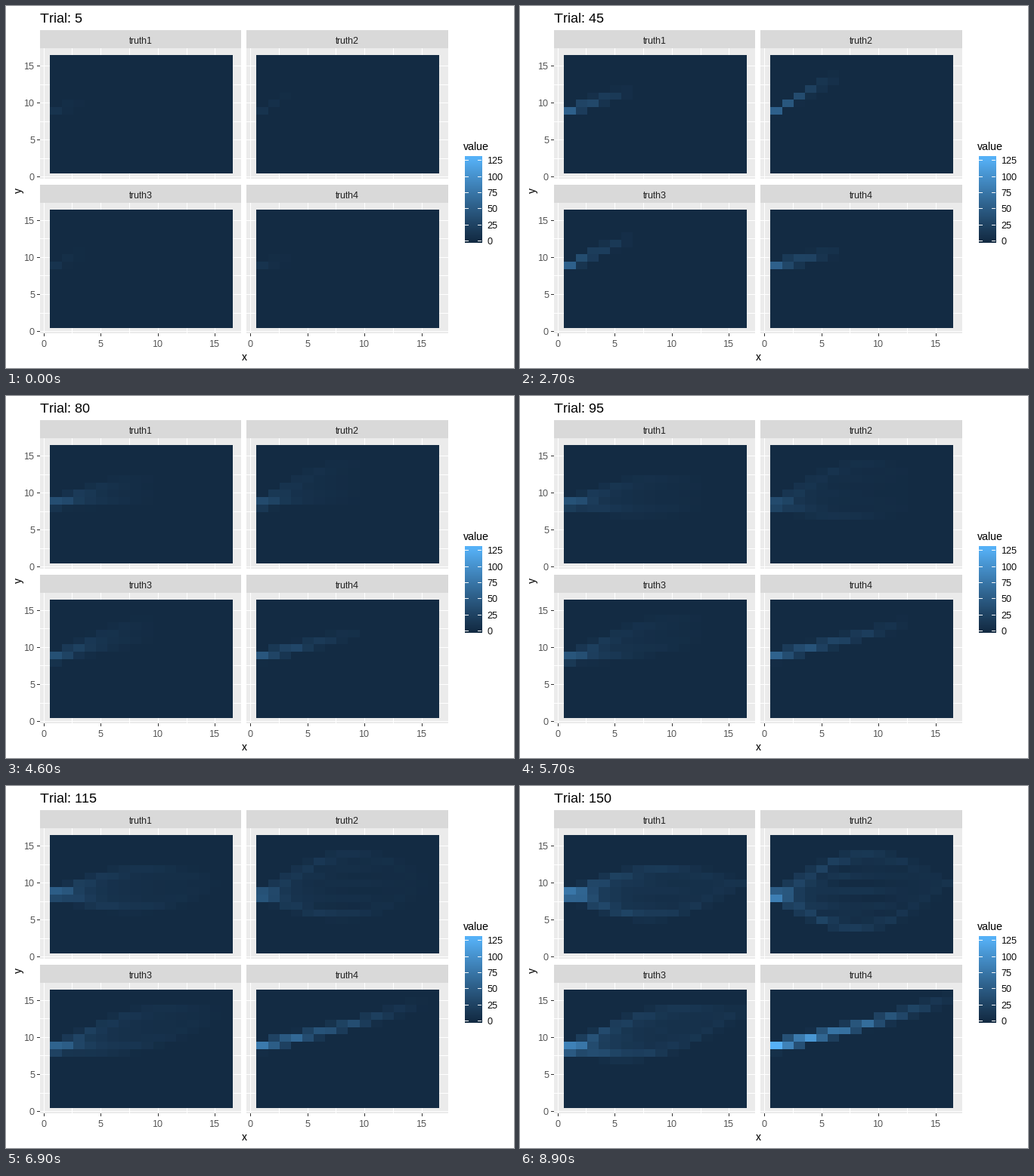
Animation, 672 px wide and 480 px high, one loop 9000 ms. Source, as a matplotlib script:

```python
import matplotlib.pyplot as plt
import numpy as np
from matplotlib.animation import FuncAnimation
from matplotlib.patches import Rectangle

plt.rcParams.update({
    "font.family": "Liberation Sans",
    "text.hinting": "default",
    "text.hinting_factor": 1,  # whole-pixel letter spacing
})

W, H, DPI = 672, 480, 96
FRAMES, STEP = 90, 100
N, VMAX = 16, 129
TILE_W, TILE_H = 242 / N, 157 / N

# ---------- colour scale: straight line in Lab ----------
TO_XYZ = np.array([[.4124, .3576, .1805], [.2126, .7152, .0722], [.0193, .1192, .9505]])
WHITE = TO_XYZ.sum(axis=1)


def rgb_to_lab(rgb):
    c = np.array(rgb) / 255
    lin = np.where(c > .04045, ((c + .055) / 1.055) ** 2.4, c / 12.92)
    t = TO_XYZ @ lin / WHITE
    f = np.where(t > .008856, np.cbrt(t), 7.787 * t + 16 / 116)
    return np.array([116 * f[1] - 16, 500 * (f[0] - f[1]), 200 * (f[1] - f[2])])


def lab_to_rgb(lab):
    fy = (lab[..., 0] + 16) / 116
    f = np.stack([fy + lab[..., 1] / 500, fy, fy - lab[..., 2] / 200], axis=-1)
    xyz = np.where(f > .2069, f ** 3, (f - 16 / 116) / 7.787) * WHITE
    lin = np.clip(xyz @ np.linalg.inv(TO_XYZ).T, 0, 1)
    return np.clip(np.where(lin > .0031308, 1.055 * lin ** (1 / 2.4) - .055, 12.92 * lin), 0, 1)


LOW, HIGH = rgb_to_lab((19, 43, 67)), rgb_to_lab((86, 177, 247))


def shade(values):
    t = np.clip(np.asarray(values) / VMAX, 0, 1)[..., None]
    return lab_to_rgb(LOW + t * (HIGH - LOW))


# ---------- timing: two ticks of rest, one halfway ----------
QUIET = (0, 1, 2, 6, 7, 10, 13, 25)  # steps in which the maps stand still
pace = [0 if k in QUIET else 1 for k in range(29)]
travel = np.concatenate([[0], np.cumsum(pace)])
LONG = {2: 0, 87: 28}  # first and last transition take two ticks


def state_at(i):
    for start, k in LONG.items():
        if i in (start, start + 1):
            return k + (i - start + 1) / 3
    n, r = divmod(i + 2, 3)
    return max(n - 1 + (.5 if r == 2 else 0), 0)


def warp(s):
    return np.interp(s, range(30), travel)


# ---------- maps: a fan of arcs from the left edge to a goal on the right ----------
STOPS = warp([0, 8.5, 15, 18.3, 21, 24.5, 29])
PEAK = [9, 55, 46, 55, 100, 58, 135]   # weight of the first column
REACH = [2.5, 5.8, 9, 12, 13, 16, 16]  # columns until the weight runs out
FAN = [0, 0, .45, .7, .7, 1, 1]        # how far the fan has opened downwards
PANELS = [(10, 2.5, -3.5), (10, 4.5, -5), (13.5, 2.3, -2.9), (15.2, -.3, -.3)]  # goal, bulges
LANES = np.array([2, 1, 1, 1, 2]) / 7

cells = np.arange(1, N + 1)
part = (cells - 1) / (N - 1)


def density(goal, up, low, peak, reach, fan):
    mass = peak * np.clip(1 - (cells - 1) / reach, 0, 1)
    start = 9 + fan * low / 8
    grid = np.zeros((N, N))
    for share, bulge in zip(LANES, np.linspace(up, up + fan * (low - up), len(LANES))):
        y = start + (goal - start) * part + bulge * np.sin(np.pi * part)
        grid += share * mass * np.clip(1 - abs(cells[:, None] - y), 0, 1)
    return grid


def maps_at(s):
    now = [np.interp(warp(s), STOPS, key) for key in (PEAK, REACH, FAN)]
    return [density(*panel, *now) for panel in PANELS]


# ---------- stage ----------
fig = plt.figure(figsize=(W / DPI, H / DPI), dpi=DPI, facecolor="white")
ax = fig.add_axes([0, 0, 1, 1])
ax.axis("off")


def box(x, y, w, h, color, z=1):
    ax.add_patch(Rectangle((x, y), w, h, fc=color, lw=0, antialiased=False, zorder=z))


def label(x, y, text, px, color="black", ha="left", **kw):
    return ax.text(x, y, text, fontsize=px * 72 / DPI, color=color, ha=ha,
                   **{"va": "baseline", **kw})


def add_panel(row, col):
    left, width = ((45, 266), (318, 267))[col]
    top = 32 + 205 * row
    box(left, top, width, 24, "#D9D9D9")
    box(left, top + 24, width, 173, "#EBEBEB")
    label(left + width / 2, top + 18, f"truth{2 * row + col + 1}", 12, "#1A1A1A", "center")

    grid_x, grid_y = (57.65, 331)[col], (222, 426.65)[row]
    for v in np.arange(0, 17, 2.5):
        gx = int(grid_x + (v - .5) * TILE_W)
        gy = int(grid_y - (v - .5) * TILE_H)
        box(gx, top + 24, 1, 173, "white", 2)
        box(left, gy, width, 1, "white", 2)
        if v % 5:
            continue
        if col == 0:
            box(left - 4, gy, 4, 1, "#333333")
            label(left - 7, gy + 5, f"{v:.0f}", 12, "#4D4D4D", "right")
        if row == 1:
            box(gx, top + 197, 1, 4, "#333333")
            label(gx, 452, f"{v:.0f}", 12, "#4D4D4D", "center")

    edges = np.arange(N + 1)
    return ax.pcolormesh(np.ceil((58, 331)[col] + edges * TILE_W),
                         np.ceil(222 + 205 * row - edges * TILE_H),
                         np.zeros((N, N, 3)), zorder=3)


tiles = [add_panel(row, col) for row in range(2) for col in range(2)]
label(315, 470, "x", 15, ha="center")
label(16.5, 245, "y", 15, ha="center", va="center", rotation=90)

# legend
label(605, 191, "value", 15)
ramp = shade(np.linspace(-2, 132, 115))[:, None]
ax.imshow(ramp, extent=(607, 630, 314, 199), origin="lower", aspect="auto",
          interpolation="nearest", zorder=3)
for v in range(0, 126, 25):
    y = int(311.5 - .855 * v)
    box(607, y, 5, 1, "white", 4)
    box(624, y, 5, 1, "white", 4)
    label(636.5, y + 5, str(v), 12)

title = label(45.4, 22, "", 18)
ax.set_xlim(0, W)
ax.set_ylim(H, 0)


def draw(i):
    s = state_at(i)
    title.set_text(f"Trial: {5 * (int(np.ceil(s - .5)) + 1)}")
    for mesh, grid in zip(tiles, maps_at(s)):
        mesh.set_array(shade(grid))
    return [title, *tiles]


anim = FuncAnimation(fig, draw, frames=FRAMES, interval=STEP, repeat=True,
                     repeat_delay=0, blit=False)
plt.show()
```
